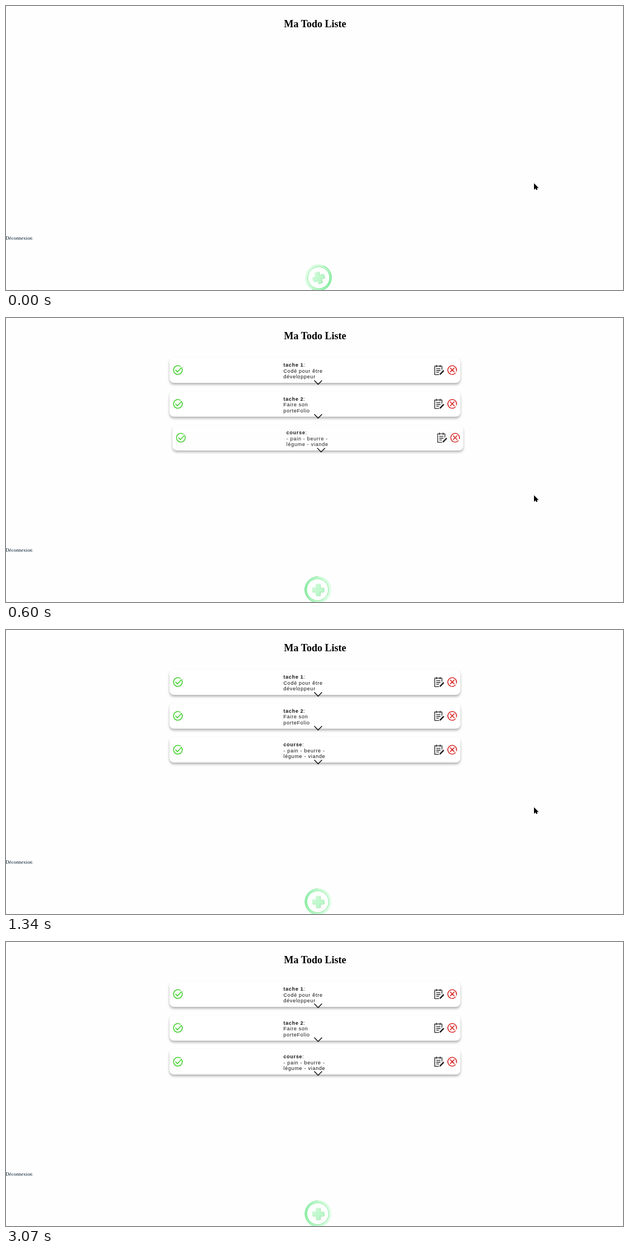
An HTML page for the animation above (3210 ms loop, 1102 by 508 pixels).

```html
<!DOCTYPE html>
<html lang="fr">
<head>
<meta charset="utf-8">
<title>Ma Todo Liste</title>
<style>
html, body { margin: 0; width: 100%; height: 100%; overflow: hidden; background: #fefefe; }
svg { display: block; width: 1102px; height: 508px; }
.serif { font-family: "Liberation Serif", "Times New Roman", serif; }
.task { font: 9px "Liberation Sans", Arial, sans-serif; letter-spacing: .72px; fill: #111; }
.bold { font-weight: bold; }
.card { fill: #fff; filter: drop-shadow(0 3px 2px rgba(0, 0, 0, .3)); }
.line { fill: none; stroke-linecap: round; stroke-linejoin: round; }
</style>
</head>
<body>
<svg viewBox="0 0 1102 508">
  <defs>
    <linearGradient id="rim">
      <stop offset="0" stop-color="#8cf0a6"/>
      <stop offset=".4" stop-color="#bdf9cb"/>
      <stop offset="1" stop-color="#e2fde8"/>
    </linearGradient>
    <linearGradient id="cross" x2="1" y2="1">
      <stop offset="0" stop-color="#d2fbdb"/>
      <stop offset="1" stop-color="#b2f5c1"/>
    </linearGradient>
    <path id="plus" d="M-3 -10.5h6q1 0 1 1v5.5h5.5q1 0 1 1v6q0 1 -1 1H4v5.5q0 1 -1 1h-6q-1 0 -1 -1V4h-5.5q-1 0 -1 -1v-6q0 -1 1 -1H-4v-5.5q0 -1 1 -1z"/>
    <g id="icons" class="line">
      <g stroke="#43cf2f" stroke-width="1.5">
        <path d="M314.3 90.2A7.8 7.8 0 1 1 311.4 86.6"/>
        <path d="M303 93.4l3.2 3.2 7.6-8"/>
      </g>
      <g stroke="#d62a2a" stroke-width="1.5">
        <path d="M802.6 98.5A7.8 7.8 0 1 1 804.5 95"/>
        <path d="M793.6 89.6l6.8 6.8M800.4 89.6l-6.8 6.8"/>
      </g>
      <g stroke="#222" stroke-width="1.3">
        <path d="M778.6 92V86.2H765.7V101.3H773M769 84.3v3.2M775.4 84.3v3.2M769 90.7h6.5M769 94h6.5M769 97.2h4"/>
        <path d="M775.6 100.4l5.6-5.8" stroke-width="2.6"/>
      </g>
    </g>
  </defs>
  <rect width="1102" height="508" fill="#fefefe"/>
  <text class="serif bold" x="552" y="38" font-size="18" text-anchor="middle">Ma Todo Liste</text>
  <text class="serif" x="-1" y="418" font-size="9" fill="#061c2c">Déconnexion</text>
  <g id="list"></g>
  <g id="button">
    <circle id="disc" r="23.8" fill="url(#rim)"/>
    <path id="edge" class="line" d="M0 -23.3A23.3 23.3 0 0 0 0 23.3" stroke="#78dd93" stroke-width="1"/>
    <circle id="face" r="19.4" fill="#fdfffd" stroke="#8ae8a3" stroke-width="1"/>
    <g id="sign">
      <use href="#plus" x=".8" y=".8" fill="#91dda5"/>
      <use href="#plus" fill="url(#cross)"/>
    </g>
  </g>
  <path id="cursor" d="M0 0V11.8L2.7 9.3 4.3 12.2 6.3 11.3 5 8.4H8.4Z"/>
</svg>
<script>
const LOOP = 3210, STEP = 66.8;
const $ = id => document.getElementById(id);
const clamp = x => Math.min(1, Math.max(0, x));
const inOut = x => x < .5 ? 2 * x * x : 1 - 2 * (1 - x) ** 2;
const smooth = x => x * x * (3 - 2 * x);

const tasks = [
  ['tache 1', 'Codé pour être', 'développeur'],
  ['tache 2', 'Faire son', 'porteFolio'],
  ['course', '- pain - beurre -', 'légume - viande']
];

// time, sign angle, side the light falls on
const wobble = [[0, -20, 1], [400, 25, -1], [600, 0, -1], [860, -13, 1], [1340, 0, -.6], [1470, 0, -.6]];
// time, x, y
const pointer = [[0, 943, 317], [1950, 943, 317], [2470, 1064.5, 449.5], [2550, 1065, 455], [2790, 1069, 512]];

$('list').innerHTML = tasks.map(([name, a, b]) => `<g>
  <rect class="card" x="292" y="71" width="519.5" height="45" rx="8"/>
  <use href="#icons"/>
  <g class="task">
    <text x="495.5" y="87.2"><tspan class="bold">${name}</tspan>:</text>
    <text x="495.5" y="97.6">${a}</text>
    <text x="495.5" y="108">${b}</text>
  </g>
  <path class="line" d="M551 112.4l6.5 6.7 6.5-6.7" stroke="#111" stroke-width="1.5"/>
</g>`).join('');
const cards = [...$('list').children];

function sample(keys, t) {
  const i = keys.findIndex(k => k[0] > t);
  if (i < 0) return keys[keys.length - 1].slice(1);
  const a = keys[i - 1], b = keys[i];
  const p = smooth((t - a[0]) / (b[0] - a[0]));
  return a.slice(1).map((v, j) => v + (b[j + 1] - v) * p);
}

const move = (el, x, y, extra = '') => el.setAttribute('transform', `translate(${x} ${y}) ${extra}`);

function draw(t) {
  cards.forEach((card, i) => {
    const p = inOut(clamp((t - 16 - i * 100) / 460));
    move(card, 100 * (1 - p), i * 60.5);
    card.setAttribute('opacity', p);
    move(card.lastElementChild, 0, -1.6 * t / 3070);
  });

  const [angle, side] = sample(wobble, t);
  move($('button'), 557.5 + side * .4, 486);
  move($('face'), side * .6, 0);
  $('edge').setAttribute('transform', `rotate(${side > 0 ? 205 : 0})`);
  $('edge').setAttribute('opacity', Math.abs(side));
  $('rim').setAttribute('gradientTransform', `rotate(${side > 0 ? 205 : 0} .5 .5)`);
  move($('sign'), 0, 0, `rotate(${angle})`);

  move($('cursor'), ...sample(pointer, t));
}

function tick() {
  const t = performance.now() % LOOP;
  draw(Math.min(46, Math.floor((t + 10) / STEP)) * STEP);
  requestAnimationFrame(tick);
}
tick();
</script>
</body>
</html>
```
